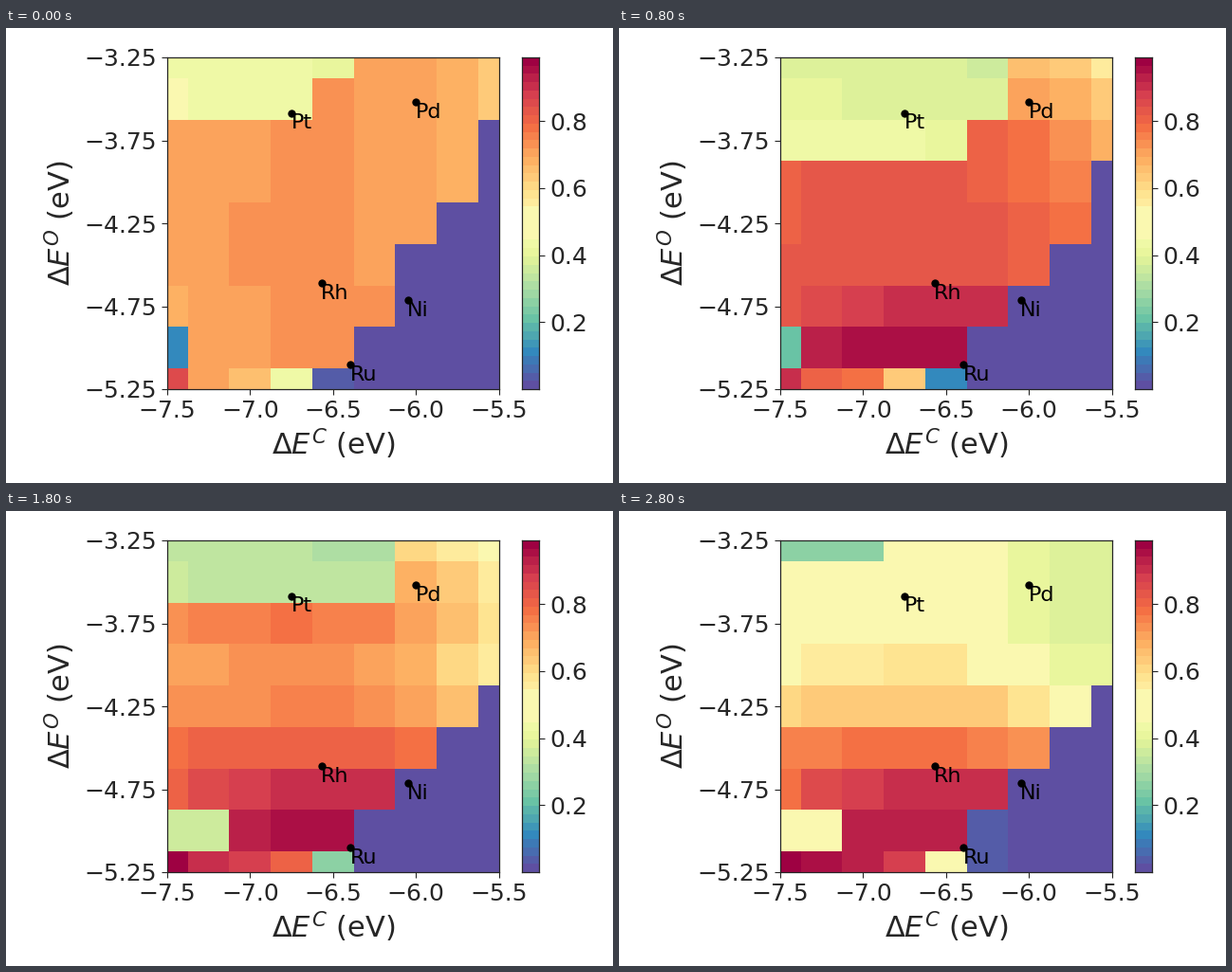
Recreate the animation shown at these times as a matplotlib script. Size 640 px wide and 480 px high, loop 3000 ms.

```python
import numpy as np
import matplotlib.pyplot as plt
from matplotlib.animation import FuncAnimation
from matplotlib.colors import ListedColormap, to_rgba

W, H, DPI = 640, 480, 100
FRAMES, INTERVAL = 15, 200
LEVELS = 40
INK = "0.15"

plt.rcParams.update({
    "font.family": "DejaVu Sans",
    "axes.edgecolor": INK,
    "axes.linewidth": 0.9,
    "xtick.color": INK,
    "ytick.color": INK,
    "text.color": INK,
})

row, col = np.mgrid[0:9, 0:9]


def banded_spectral():
    colors = plt.get_cmap("Spectral_r")(np.linspace(0, 1, LEVELS))
    colors[18:22] = to_rgba("#faf8b0")
    return ListedColormap(colors)


def hot_layer(k):
    """Every row heats up quickly, then cools; upper rows cool later but further."""
    peak = np.interp(row, [0, 2, 3, 5, 7], [71, 82, 84, 84, 97])
    end = np.interp(row, [2, 4, 6, 7], [51, 65, 92, 95])
    rise = np.interp(k, [0, 2, 4], [0, 0.85, 1])
    late = max(k - 6, 0) / 8
    fall = late ** np.maximum(0.8, 3 - abs(row - 1))
    base = 72.8 + (peak - 72.8) * rise + (end - peak) * fall

    # the sides are cooler than the middle, more so as time goes on
    left = (0.15 + 0.02 * k) * np.interp(row, [3, 5, 6], [1, 0.4, 2.5])
    right = (0.4 + 0.07 * k) * np.interp(row, [3, 6], [1, 0.2])
    dip = np.where(col < 3.5, left, right) * (col - 3.5) ** 2
    return np.maximum(base - np.minimum(dip, 18), 38)


def green_layer(k):
    level = np.interp(k, [0, 10, 14], [43, 32, 25])
    return level + 1.2 * row ** 2 - 0.5 * (col - 2)


def green_area(k):
    depth = round(np.interp(k, [0, 1, 8, 12], [2, 3, 3, 1]))
    reach = np.interp(k, [0, 2, 4, 10, 12, 14], [5, 6, 6.5, 7, 7, 3])
    return (row < depth) & (col < np.floor(reach - row / 2))


def dead_area(k):
    """Everything right of a slanted line that moves out and steepens."""
    t = min(k, 8)
    edge = np.floor(9.92 + 0.325 * t - (0.6 + 0.05 * t) * row)
    return col >= np.maximum(edge, 5)


def field(k):
    u = k / (FRAMES - 1)
    z = np.where(green_area(k), green_layer(k), hot_layer(k))
    z[dead_area(k)] = 0

    # cold spot at the left of the second row from below
    cold = 2 if k > 8 else 1
    z[7, :cold] = min(10 + 3 * k, 47)

    # bottom row: a warm ramp that levels out, then two late cells
    c = np.arange(4)
    start = np.interp(c, [0, 1, 2, 3], [86, 70, 65, 44])
    ease = 1 - (1 - u) ** 1.8
    z[8, :4] = start + (100 - 3.5 * c - start) * ease
    z[8, 4] = 4 + 44 * u ** 1.5
    z[7:, 5] = 4 * u ** 3
    return z


def px_axes(left, top, width, height):
    return fig.add_axes([left / W, 1 - (top + height) / H, width / W, height / H])


def edges(first, last):
    """Cell borders around nine grid points, cut in half at both ends."""
    mid = np.linspace(first, last, 9)
    return np.concatenate(([first], (mid[1:] + mid[:-1]) / 2, [last]))


fig = plt.figure(figsize=(W / DPI, H / DPI), dpi=DPI, facecolor="white")
cmap = banded_spectral()
ticks = dict(labelsize=18, length=4.3, pad=3.6)

ax = px_axes(169.8, 31, 350, 350)
mesh = ax.pcolormesh(edges(-7.5, -5.5), edges(-3.25, -5.25), field(0),
                     cmap=cmap, vmin=0, vmax=100)
ax.set(xlim=(-7.5, -5.5), ylim=(-5.25, -3.25),
       xticks=np.arange(-7.5, -5.4, 0.5), yticks=np.arange(-5.25, -3.2, 0.5))
ax.xaxis.set_major_formatter("{x:.1f}")
ax.yaxis.set_major_formatter("{x:.2f}")
ax.tick_params(**ticks)

metals = {"Pt": (-6.75, -3.585), "Pd": (-6.0, -3.52), "Rh": (-6.57, -4.61),
          "Ni": (-6.05, -4.715), "Ru": (-6.395, -5.1)}
for name, (x, y) in metals.items():
    ax.plot(x, y, "o", color="black", ms=6, mew=0)
    ax.annotate(name, (x, y), (-0.4, -0.8), textcoords="offset pixels",
                color="black", size=16, ha="left", va="top")

label = dict(size=22, ha="center", va="baseline", rotation_mode="anchor")
fig.text(344.8 / W, 1 - 450 / H, r"$\Delta E^C$ (eV)", **label)
fig.text(68 / W, 1 - 206 / H, r"$\Delta E^O$ (eV)", rotation=90, **label)

bar = px_axes(544, 31, 18, 350)
bar.pcolormesh([0, 1], np.linspace(0, 0.99, LEVELS + 1),
               np.arange(LEVELS)[:, None], cmap=cmap)
bar.set(xticks=[], yticks=[0.2, 0.4, 0.6, 0.8], ylim=(0, 0.99))
bar.yaxis.tick_right()
bar.tick_params(**ticks)


def draw(frame):
    mesh.set_array(field(frame))
    return (mesh,)


anim = FuncAnimation(fig, draw, frames=FRAMES, interval=INTERVAL,
                     repeat=True, repeat_delay=0, blit=False)
plt.show()
```
